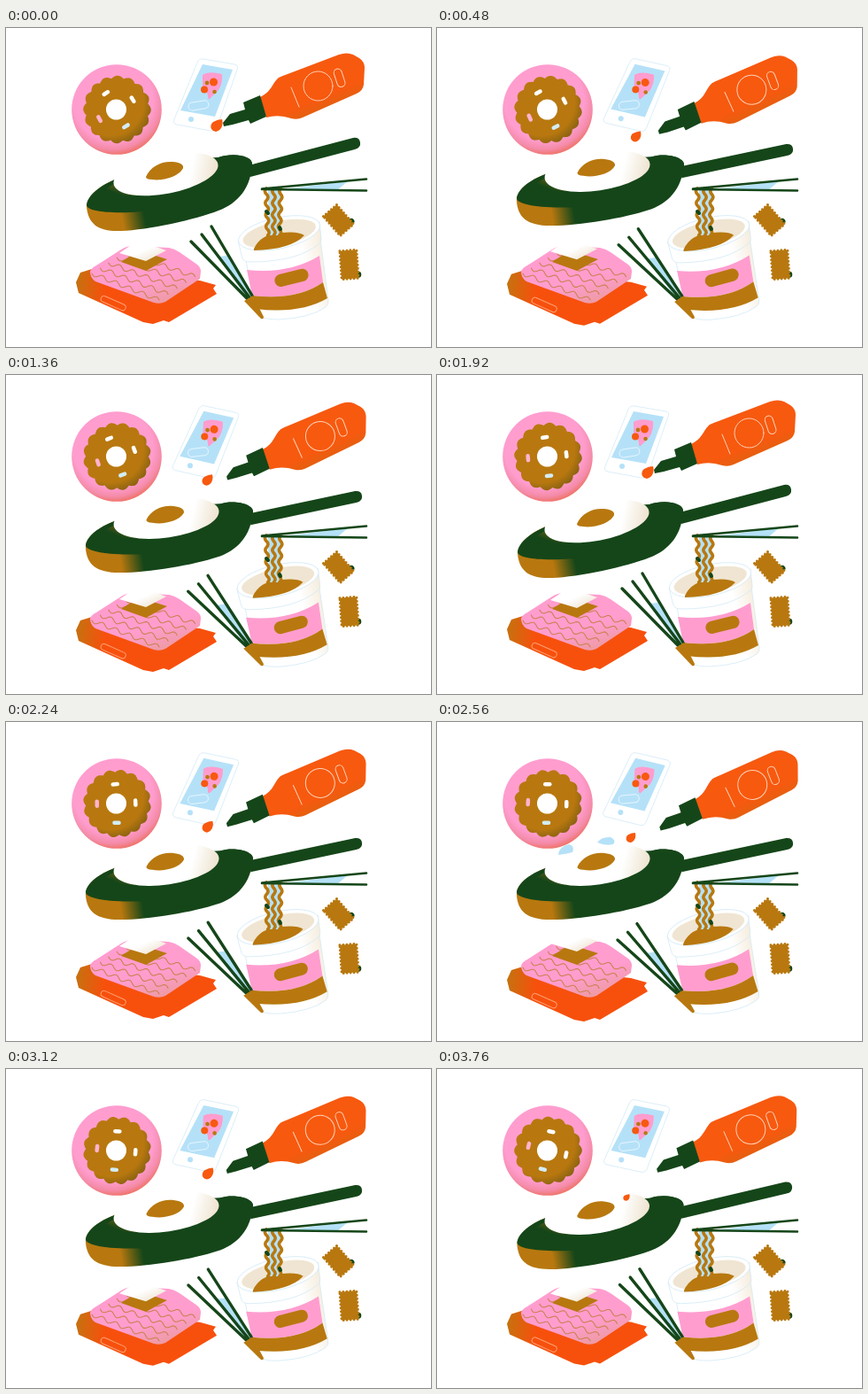
Write an HTML page that moves like this. It is 480 by 360 pixels and loops after 3.84 s.

```html
<!DOCTYPE html>
<html lang="en">
<head>
<meta charset="utf-8">
<title>Snack time</title>
<style>
html, body { margin: 0; width: 100%; height: 100%; overflow: hidden; background: #fff; }
svg { display: block; width: 480px; height: 360px; }
.o { fill: #f7590f } .p { fill: #ff9dcf } .b { fill: #b8780f } .g { fill: #154619 } .l { fill: #b5e1f8 } .w { fill: #fff }
.line { fill: none; stroke-linecap: round; stroke-linejoin: round }
.edge { stroke: #d3eaf7; stroke-width: .8 }
</style>
</head>
<body>
<svg viewBox="0 0 480 360">
  <defs>
    <radialGradient id="ring" gradientUnits="userSpaceOnUse" cx="121" cy="82" r="64">
      <stop offset=".7" stop-color="#ff9dcf"/><stop offset=".86" stop-color="#f48ba8"/><stop offset="1" stop-color="#ee6a50"/>
    </radialGradient>
    <radialGradient id="glaze" gradientUnits="userSpaceOnUse" cx="118" cy="84" r="52">
      <stop offset=".72" stop-color="#b8780f"/><stop offset="1" stop-color="#7d5c12"/>
    </radialGradient>
    <linearGradient id="bottleFill" gradientUnits="userSpaceOnUse" x1="350" y1="60" x2="366" y2="99">
      <stop offset=".45" stop-color="#f7590f"/><stop offset="1" stop-color="#d96410"/>
    </linearGradient>
    <linearGradient id="panFill" gradientUnits="userSpaceOnUse" x1="92" y1="212" x2="154" y2="200">
      <stop offset=".6" stop-color="#b8780f"/><stop offset="1" stop-color="#154619"/>
    </linearGradient>
    <linearGradient id="panTop" gradientUnits="userSpaceOnUse" x1="134" y1="190" x2="140" y2="173">
      <stop offset="0" stop-color="#154619"/><stop offset="1" stop-color="#8f6a12"/>
    </linearGradient>
    <linearGradient id="eggFill" gradientUnits="userSpaceOnUse" x1="195" y1="155" x2="236" y2="172">
      <stop offset=".4" stop-color="#fff"/><stop offset="1" stop-color="#efe5d2"/>
    </linearGradient>
    <linearGradient id="cupFill" gradientUnits="userSpaceOnUse" x1="310" y1="270" x2="364" y2="258">
      <stop offset=".5" stop-color="#fff"/><stop offset="1" stop-color="#f4ead9"/>
    </linearGradient>
    <linearGradient id="trayFill" gradientUnits="userSpaceOnUse" x1="80" y1="295" x2="125" y2="300">
      <stop offset="0" stop-color="#c8700f"/><stop offset=".7" stop-color="#f7500d"/>
    </linearGradient>
    <linearGradient id="blockFill" gradientUnits="userSpaceOnUse" x1="160" y1="270" x2="172" y2="312">
      <stop offset=".35" stop-color="#ff9dcf"/><stop offset="1" stop-color="#ee9aa4"/>
    </linearGradient>
    <linearGradient id="patFill" gradientUnits="userSpaceOnUse" x1="152" y1="246" x2="160" y2="264">
      <stop offset=".3" stop-color="#fff"/><stop offset="1" stop-color="#f1e8d8"/>
    </linearGradient>
    <clipPath id="scallop"><path id="lobes"/></clipPath>
  </defs>

  <!-- donut -->
  <circle cx="125" cy="92" r="50.8" fill="url(#ring)"/>
  <circle cx="125.500" cy="92" r="42" fill="url(#glaze)" clip-path="url(#scallop)"/>
  <circle class="w" cx="124.500" cy="92" r="11.500"/>
  <g id="sprinkles"></g>

  <g id="phone">
    <path class="w edge" d="M223 35L258 41Q263 42 261 47L238 113Q236 117 231 116L193 109Q188 108 190 103L216 39Q218 34 223 35Z"/>
    <path class="l" d="M222 41L256 47L236 100L197 93Z"/>
    <path class="p" d="M222 53Q229 48 244 52Q245 62 240 70L230 80Q228 81 228 77Q228 73 222 67Z"/>
    <g class="o"><circle cx="234.500" cy="61" r="4.500"/><circle cx="224" cy="69.500" r="4"/></g>
    <g class="b"><circle cx="227" cy="62" r="2.400"/><circle cx="235.500" cy="72" r="2.300"/></g>
    <rect class="line" stroke="#e6f5fd" x="206" y="83" width="23" height="9" rx="4.500" transform="rotate(-9 217 88)"/>
    <circle class="l" cx="209" cy="103" r="3"/>
  </g>

  <g id="bottle">
    <path fill="url(#bottleFill)" d="M287 78C300 72 300 63 308 56Q312 54 318 52L376 30Q385 27 392 30L399 34Q405 38 405 45L404 64Q403 71 396 74L335 101Q329 104 322 102Q308 97 294 101Z"/>
    <path class="g" d="M245 107L253 97L270 92L268 84L287 76L294 100L276 108L274 104L256 109L246 111Z"/>
    <g class="line" stroke="#ffd0b4">
      <path d="M322 67L331 89"/><circle cx="352.500" cy="65.500" r="16.500"/>
      <rect x="372" y="46" width="9" height="21" rx="4.500" transform="rotate(-18 376 56)"/>
    </g>
  </g>

  <g id="pan">
    <path class="g" d="M274 155L392 124Q399 123 400 129Q401 135 394 137L276 168Z"/>
    <path fill="url(#panFill)" d="M91 202C91 190 106 177 128 169L200 150L240 146C256 140 278 144 278 153C277 180 262 198 240 206C215 216 160 228 130 229C105 230 93 222 91 202Z"/>
    <path class="g" d="M91 200C92 189 106 177 128 169L200 150L240 146C256 140 278 144 278 153C272 180 200 206 140 208C110 209 92 206 91 200Z"/>
    <path fill="url(#panTop)" d="M110 184C120 175 130 172 150 174L174 186C150 191 124 190 110 184Z"/>
    <ellipse fill="url(#eggFill)" cx="180.500" cy="165" rx="60" ry="22" transform="rotate(-11 180 165)"/>
    <path class="b" d="M158 168C163 156 176 150 188 151Q201 152 200 158C196 167 178 173 165 171Q158 171 158 168Z"/>
  </g>
  <g id="puffs" class="l">
    <path d="M137 150Q138 140 149 138Q156 140 153 147Q146 149 137 150Z"/>
    <path d="M181 136Q186 129 196 130Q203 133 199 138Q190 140 181 136Z"/>
  </g>
  <path id="drop" class="o" d="M6 -7C8 -1 5 6 -1 7C-8 6 -8 -1 -4 -4Q1 -7 6 -7Z"/>

  <!-- cup with noodles -->
  <g id="cup">
    <path class="edge" fill="url(#cupFill)" d="M271 262L282 321Q285 329 308 329Q344 327 361 315Q365 312 364 307L355 238Z"/>
    <path class="p" d="M272 273Q320 278 354 257L358 287Q328 308 278 302Z"/>
    <path class="b" d="M278 302Q328 308 358 287L363 305Q332 323 282 317Z"/>
    <rect class="b" x="303" y="275" width="39" height="14" rx="7" transform="rotate(-14 322 282)"/>
    <path class="edge" fill="url(#cupFill)" d="M262 240L267 260Q269 264 276 264Q328 264 353 244Q357 241 356 237L354 219Z"/>
    <ellipse class="w edge" cx="308.500" cy="231.500" rx="47" ry="17.500" transform="rotate(-12 308 231)"/>
    <ellipse fill="#efe5d2" cx="308.500" cy="232" rx="42" ry="14" transform="rotate(-12 308 231)"/>
    <path class="b" d="M280 249Q288 232 311 231Q330 229 337 234Q322 250 280 251Z"/>
  </g>
  <path class="l" d="M296 182H311L309 234H297Z"/>
  <g id="noodles" class="line" stroke="#b8780f" stroke-width="3.600"></g>
  <path class="line" stroke="#154619" stroke-width="4" d="M294 207L296 209M309 225L310 227"/>
  <path class="l" d="M312 182L386 173L374 183Z"/>
  <path class="line" stroke="#154619" stroke-width="2.600" d="M289 181.500L407 170.500M289 182L407 183.500"/>

  <g id="crackers"></g>

  <g id="sticks">
    <path class="l" d="M239 258L250 257L276 302L270 302Z"/>
    <path class="line" stroke="#154619" stroke-width="3.400" d="M209 241L272 305M221 233L275 304M232 224L278 302"/>
    <path class="b" d="M269 308L279 302L291 326Q291 329 288 328Z"/>
  </g>

  <!-- tray, block and pat -->
  <g id="tray">
    <path fill="url(#trayFill)" d="M79 287L84 276L97 272L219 285L237 290L234 294L238 300L184 332L178 330L166 334L155 332L82 299Z"/>
    <rect class="line" stroke="#ff9f70" x="106" y="307" width="30" height="7" rx="3.500" transform="rotate(24 121 311)"/>
  </g>
  <g id="block">
    <path fill="url(#blockFill)" d="M95 275Q96 271 102 268L130 250Q136 246 144 246L184 248Q190 249 196 253L216 267Q220 270 220 275L219 283L180 309Q174 312 167 310L101 286Q95 282 95 275Z"/>
    <g id="ripples" class="line" stroke="#cb8150" stroke-width="1.100"></g>
    <path class="b" d="M130 264L150 251L182 261L158 274Z"/>
  </g>
  <path id="pat" fill="url(#patFill)" d="M128 254L149 240L181 251L158 263Z"/>
</svg>
<script>
const $ = id => document.getElementById(id);
const LOOP = 3840, BEAT = 960, STEP = 80;

// Polyline of n+1 points from a function of 0..1
const trace = (n, point) =>
  'M' + Array.from({ length: n + 1 }, (_, i) => point(i / n).map(v => v.toFixed(1)).join(' ')).join('L');

const wave = (x0, y0, x1, y1, cycles, amp) => {
  const len = Math.hypot(x1 - x0, y1 - y0);
  return trace(cycles * 8, u => {
    const k = amp * Math.sin(u * cycles * 2 * Math.PI) / len;
    return [x0 + (x1 - x0) * u - (y1 - y0) * k, y0 + (y1 - y0) * u + (x1 - x0) * k];
  });
};

const path = d => `<path d="${d}"/>`;

$('lobes').setAttribute('d', trace(192, u => {
  const a = u * 2 * Math.PI, r = 35.3 + 3 * Math.abs(Math.sin(8 * a));
  return [125.5 + r * Math.cos(a), 92 + r * Math.sin(a)];
}) + 'Z');

$('sprinkles').innerHTML = ['#fff', '#fff', '#d3ecf5', '#ffb3cf'].map((fill, i) =>
  `<rect x="120" y="68" width="9.500" height="4.500" rx="2.200" fill="${fill}" transform="rotate(${i * 91} 124.500 92)"/>`).join('');

$('noodles').innerHTML = [294, 302.5, 310.5].map(x => path(wave(x, 181, x + (302 - x) * .2, 234, 4, 1.7))).join('');

$('ripples').innerHTML = [0, .22, .44, .66, .88].map(k =>
  path(wave(97 + 43 * k, 277 - 27 * k, 173 + 46 * k, 307 - 30 * k, 5, 2.4))).join('');

const cracker = (x, y, w, h, turn) => {
  const box = `x="${-w / 2}" y="${-h / 2}" width="${w}" height="${h}"`;
  return `<g transform="translate(${x} ${y}) rotate(${turn})">` +
    `<circle class="g" cx="${w / 2}" cy="${h / 2 - 4}" r="3.500"/><rect class="b" ${box}/>` +
    `<rect ${box} class="line" stroke="#b8780f" stroke-width="3" stroke-dasharray="0 4"/></g>`;
};
$('crackers').innerHTML = cracker(375.5, 217, 20, 29, -41) + cracker(387.5, 267, 19, 32, -4);

const mix = (keys, t) => {
  const i = Math.max(1, keys.findIndex(k => k[0] >= t));
  const [t0, a] = keys[i - 1], [t1, b] = keys[i];
  return a + (b - a) * (t - t0) / (t1 - t0);
};

const SPIN = [[0, -33], [960, -24], [1360, -22], [1920, -8], [2560, 0], [3120, 3], [3760, 11], [3840, 12]];
const SWAY = [[0, 0], [240, .6], [400, .65], [640, 1], [880, .5], [960, 0]];
const TILT = [[0, 0], [240, 1], [640, 1], [880, .5], [960, 0]];
const DROP_X = [[0, 238], [240, 228], [400, 227.5], [640, 219], [880, 214], [960, 214]];
const DROP_Y = [[0, 110], [240, 118], [400, 118.5], [640, 130.5], [880, 145], [960, 145]];
const DROP_SIZE = [[0, 1], [400, .9], [640, .8], [880, .55], [960, .55]];

const move = (id, value) => $(id).setAttribute('transform', value);

function draw(now) {
  let t = Math.floor(now % LOOP / STEP) * STEP;
  if (t === 160 || [560, 800].includes(t % BEAT)) t -= STEP;   // held poses
  const p = t % BEAT, sway = mix(SWAY, p), tilt = mix(TILT, p), spin = mix(SPIN, t);
  const hop = 4 * sway ** 3;

  move('sprinkles', `rotate(${spin} 124.500 92)`);
  move('lobes', `rotate(${spin} 125.500 92)`);
  move('phone', `rotate(${3.5 * sway} 226 76)`);
  move('bottle', `translate(${2.5 * sway} ${2.5 * sway}) rotate(${-3.3 * sway} 404 45)`);
  move('pan', `rotate(${2.8 * tilt} 250 175)`);
  move('sticks', `rotate(${-3.4 * sway} 290 328)`);
  move('cup', `rotate(${-1.5 * sway} 323 322)`);
  move('tray', `translate(0 ${hop})`);
  move('pat', `translate(0 ${-hop})`);
  move('drop', `translate(${mix(DROP_X, p)} ${mix(DROP_Y, p)}) scale(${mix(DROP_SIZE, p)})`);
  $('drop').style.display = t === BEAT ? 'none' : '';
  $('puffs').style.display = p >= 600 && p < 760 ? '' : 'none';
}

const start = performance.now();
const tick = () => {
  draw(performance.now() - start);
  requestAnimationFrame(tick);
};
draw(0);
requestAnimationFrame(tick);
</script>
</body>
</html>
```
